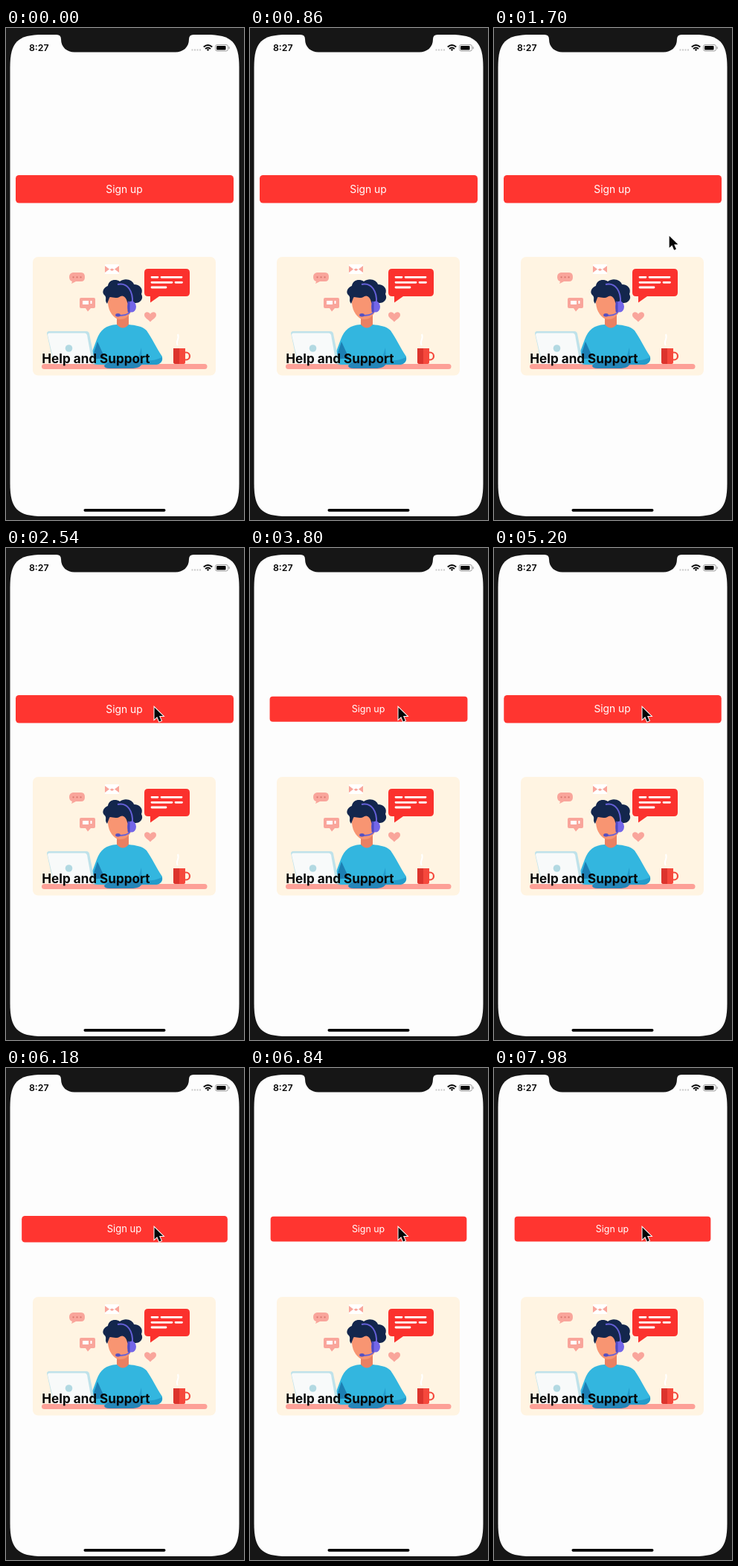
These frames come from a looping animation (320 px wide and 662 px high, 8000 ms). An HTML page:

```html
<!DOCTYPE html>
<html lang="en">
<head>
<meta charset="utf-8">
<title>Sign up press</title>
<style>
  html, body { margin: 0; width: 100%; height: 100%; overflow: hidden; background: #161616; }
  svg { display: block; width: 100vw; height: 100vh; }
  text { font-family: Inter, Roboto, sans-serif; }
</style>
</head>
<body>
<svg viewBox="0 0 320 662">
  <!-- phone -->
  <rect width="320" height="662" fill="#161616"/>
  <path d="M5.500 53C5.500 19 15.500 9 49.500 9H269.500C303.500 9 313.500 19 313.500 53V613C313.500 647 303.500 657 269.500 657H49.500C15.500 657 5.500 647 5.500 613Z" fill="#fdfdfd"/>
  <path d="M68 8V9Q74 9 74 15C74 26 82 32.500 92 32.500H228C238 32.500 246 26 246 15Q246 9 252 9V8Z" fill="#161616"/>
  <rect x="104.500" y="647" width="110" height="3.700" rx="1.850" fill="#000"/>

  <!-- status bar -->
  <text x="31" y="31" font-size="12.300" font-weight="600" fill="#050505">8:27</text>
  <path d="M249.500 29.500H262" stroke="#c9c9c9" stroke-width="2" stroke-dasharray="2 1.500"/>
  <g fill="none" stroke="#050505" stroke-width="2">
    <path d="M265.800 25.600Q271.500 20.500 277.200 25.600M268 28Q271.500 25 275 28"/>
    <path d="M269.800 28.900L271.500 31L273.200 28.900Q271.500 27.800 269.800 28.900Z" fill="#050505" stroke="none"/>
  </g>
  <rect x="281.500" y="22.500" width="17" height="8.500" rx="2.500" fill="none" stroke="#a0a0a0"/>
  <rect x="283" y="24" width="12.500" height="5.500" rx="1.200" fill="#050505"/>
  <path d="M300.200 25.200V28.300" stroke="#a0a0a0" stroke-width="1.200"/>

  <g id="button">
    <rect x="13" y="198" width="293" height="37.500" rx="4.500" fill="#ff3530"/>
    <text x="159" y="221.500" font-size="13.800" fill="#fff" text-anchor="middle">Sign up</text>
  </g>

  <!-- help card -->
  <rect x="36" y="308" width="246" height="159.500" rx="7" fill="#fff4e2"/>

  <g fill="#f9a59b">
    <path d="M90 329H101Q106 329 106 335T101 341H94L88 344L89 341Q85 340 85 335T90 329Z"/>
    <path d="M101 363H118Q120 363 120 365V375Q120 377 118 377H114L110 381.500L107 377H101Q99 377 99 375V365Q99 363 101 363Z"/>
    <path d="M194 395.500C191 392 186 390 186 386C186 381.500 192 381 194 385C196 381 202 381.500 202 386C202 390 197 392 194 395.500Z"/>
  </g>
  <path d="M90.500 335.300h.1M95.500 335.300h.1M100.500 335.300h.1" stroke="#d8766d" stroke-width="2.200" stroke-linecap="round"/>
  <path d="M103 367h8v5h-8zM113.500 367h2v4h-2z" fill="#fff"/>
  <rect x="133" y="318" width="19" height="13" rx="1" fill="#fff"/>
  <path d="M133 320L139 324.500L133 329ZM152 320L146 324.500L152 329ZM139.500 325L142.500 327L145.500 325L142.500 323.500Z" fill="#f9a59b"/>

  <path d="M191 324H242Q247 324 247 329V356Q247 361 242 361H206L194 369.500V361H191Q186 361 186 356V329Q186 324 191 324Z" fill="#fb312d"/>
  <path d="M196 335.300H204M209 335.300H236M196 342.300H223M228 342.300H236.500M196 349H215" stroke="#fff" stroke-width="2.800" stroke-linecap="round"/>

  <rect x="48" y="452" width="222.500" height="7" rx="3.500" fill="#fda097"/>

  <!-- support agent -->
  <path d="M149 399C134 400 127 406 122 419L112 446Q113 453 123 453H202Q212 451 210 442C202 430 196 417 189 407C183 401 174 400 165 399Z" fill="#33b6df"/>
  <path d="M182 430L178 444L135 450L139 453H202Q211 451 210 443Q197 449 183 447Z" fill="#239bcb"/>
  <path d="M123 422L115 446L133 444Z" fill="#1c7fb4"/>
  <path d="M149 385H165V399Q157 408 149 399Z" fill="#ea8062"/>
  <path d="M137 361C139 349 168 346 169 366V378C166 391 155 395 147 390C139 384 136 374 137 361Z" fill="#f89572"/>
  <path d="M136 371C132 366 136 364 133 360C127 355 133 348 137 347C138 339 147 337 153 341C161 335 171 340 172 345C180 345 185 351 182 358C186 365 179 371 173 370L168 378L163 369C162 363 158 359 154 361C147 366 140 360 139 363Z" fill="#13264d"/>
  <path d="M150 345C164 342 171 355 170 370M169 378Q165 388 152 386.500" fill="none" stroke="#6560d8" stroke-width="2"/>
  <ellipse cx="169" cy="375" rx="6" ry="7.500" fill="#7466e8"/>
  <path d="M165 369V381" stroke="#4e4ac0" stroke-width="3" stroke-linecap="round"/>
  <ellipse cx="150.500" cy="386.300" rx="3.300" ry="2.200" fill="#5751c0"/>
  <path d="M132 454Q139 447 151 447L184 450Q182 457 171 458H139Q132 458 132 454Z" fill="#2485b8"/>

  <!-- laptop -->
  <path d="M58 408H108Q111 408 112 411L120 452H64L55 411Q55 408 58 408Z" fill="#bfe2ea"/>
  <path d="M58 410.500H106Q108 410.500 109 413L116 452H65L56 413Q56 410.500 58 410.500Z" fill="#f8fafa"/>
  <circle cx="84.500" cy="431" r="4.800" fill="#b2d9e2"/>

  <!-- mug -->
  <path d="M231 427C227 422 234 419 231 412" fill="none" stroke="#fff" stroke-width="2"/>
  <circle cx="242" cy="441.500" r="5" fill="none" stroke="#f5483c" stroke-width="2.200"/>
  <path d="M225 431H241V450Q241 452 239 452H228Q225 452 225 449Z" fill="#f5483c"/>
  <path d="M225 431H233V452H228Q225 452 225 449Z" fill="#dc342d"/>

  <text x="48.300" y="451" font-size="17.100" font-weight="700" fill="#050505">Help and Support</text>

  <path id="cursor" d="M0 0V16L3.700 12.600L6.500 19L9.300 17.800L6.500 11.600H11.700Z"
        fill="#050505" stroke="#fff" stroke-width="2" paint-order="stroke"/>
</svg>
<script>
const LOOP = 8000;
const CENTER = { x: 159.5, y: 216.7 };
const PRESSED = 0.9;
const FREQUENCY = 15.17;      // natural frequency of the button spring, rad/s
const PRESS_DAMPING = 0.725;
const RELEASE_DAMPING = 0.33; // loose enough to bounce past full size
const button = document.getElementById('button');
const cursor = document.getElementById('cursor');

const move = { start: 1430, end: 2250, from: [320, 432], to: [199.5, 214.5] };
const taps = [[2785, 3010], [3610, 3880], [4435, 4640], [5330, 5640], [6085, LOOP]];
const events = taps.flatMap(([down, up]) => [
  { time: down, target: PRESSED, damping: PRESS_DAMPING },
  { time: up, target: 1, damping: RELEASE_DAMPING },
]);

// Underdamped spring: position and velocity after the given seconds.
function spring({ position, velocity }, { target, damping }, seconds) {
  const decay = damping * FREQUENCY;
  const w = FREQUENCY * Math.sqrt(1 - damping ** 2);
  const a = position - target;
  const b = (velocity + decay * a) / w;
  const fade = Math.exp(-decay * seconds);
  const cos = Math.cos(w * seconds), sin = Math.sin(w * seconds);
  const offset = fade * (a * cos + b * sin);
  return {
    position: target + offset,
    velocity: fade * w * (b * cos - a * sin) - decay * offset,
  };
}

function buttonScale(t) {
  let state = { position: 1, velocity: 0 };
  events.forEach((event, i) => {
    const end = Math.min(t, events[i + 1]?.time ?? LOOP);
    if (end > event.time) state = spring(state, event, (end - event.time) / 1000);
  });
  return state.position;
}

function cursorPosition(t) {
  const progress = Math.min(1, Math.max(0, (t - move.start) / (move.end - move.start)));
  const remaining = (1 - progress) ** 3;
  return move.to.map((end, i) => end + (move.from[i] - end) * remaining);
}

function draw(t) {
  const { x, y } = CENTER;
  button.setAttribute('transform', `translate(${x} ${y}) scale(${buttonScale(t)}) translate(${-x} ${-y})`);
  cursor.setAttribute('transform', `translate(${cursorPosition(t)})`);
  cursor.setAttribute('visibility', t < move.start ? 'hidden' : 'visible');
}

function tick() {
  draw(performance.now() % LOOP);
  requestAnimationFrame(tick);
}
tick();
</script>
</body>
</html>
```
